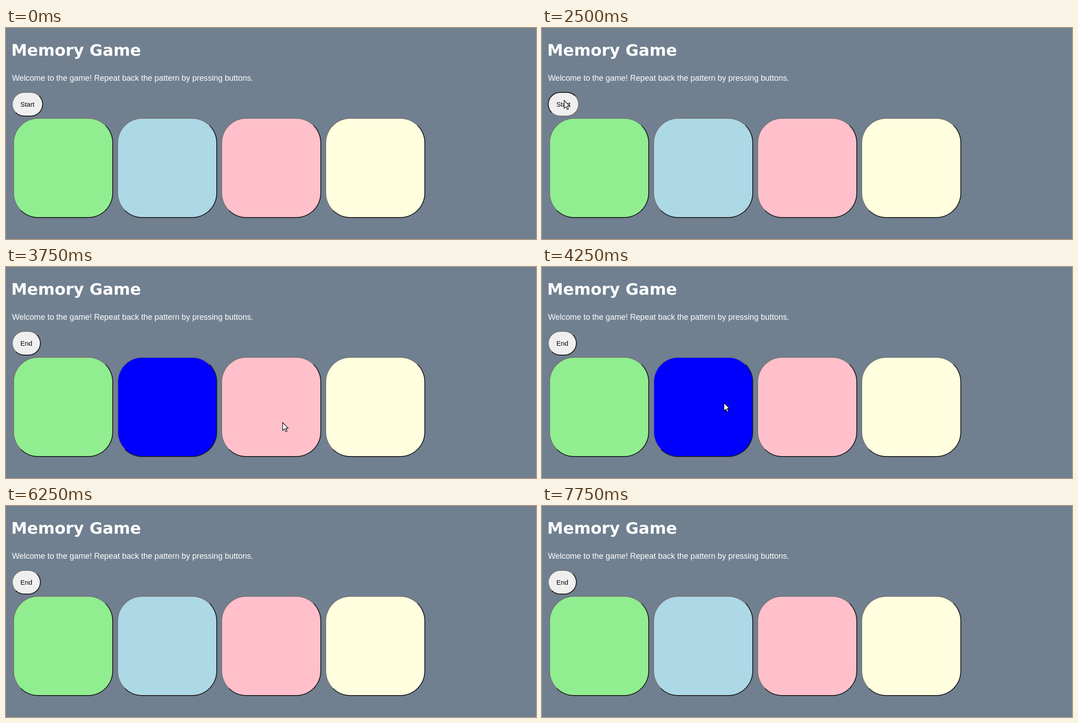
Animation of 1187x472 px, one loop 8000 ms. Source, as an HTML page:

```html
<!DOCTYPE html>
<html lang="en">
<head>
<meta charset="utf-8">
<title>Memory Game</title>
<style>
  :root { --light: #767676; --dark: #212121; }
  html, body { margin: 0; width: 100%; height: 100%; overflow: hidden; background: #708090; }
  svg { position: absolute; left: 0; top: 0; overflow: visible; }
  .copy { fill: #fff; }
  .copy .title { font: bold 35.84px "DejaVu Sans", Verdana, sans-serif; }
  .copy .intro { font: 17.92px "Liberation Sans", Arial, sans-serif; }

  .button, .tile {
    position: absolute;
    box-sizing: border-box;
    border: 2px solid;
    border-color: var(--light) var(--dark) var(--dark) var(--light);
  }
  .button {
    left: 13.44px; top: 143px; height: 55px;
    padding: 0 16.8px;
    border-radius: 28px;
    background: #efefef; color: #000;
    font: 14.93px/51px "Liberation Sans", Arial, sans-serif;
    white-space: nowrap;
  }
  .tile { top: 201px; width: 224px; height: 224px; border-radius: 56px; }
  .green { left: 16px; background: lightgreen; }
  .blue { left: 249px; background: lightblue; }
  .pink { left: 482px; background: pink; }
  .yellow { left: 715px; background: lightyellow; }

  .start, .end, .blue, .cursor { animation: 8s step-end infinite; }
  .start { animation-name: start; }
  .end { animation-name: end; }
  .blue { animation-name: flash; }
  .cursor { animation-name: point; }

  @keyframes start {
    0% { visibility: visible; border-color: var(--light) var(--dark) var(--dark) var(--light); }
    31.25% { visibility: visible; border-color: var(--dark) var(--light) var(--light) var(--dark); }
    34.375%, 100% { visibility: hidden; border-color: var(--light) var(--dark) var(--dark) var(--light); }
  }
  @keyframes end {
    0% { visibility: hidden; }
    34.375%, 100% { visibility: visible; }
  }
  @keyframes flash {
    0%, 56.25%, 96.875%, 100% { background: lightblue; }
    46.875%, 84.375% { background: blue; }
  }
  @keyframes point {
    0% { visibility: hidden; transform: translate(21px, 442px); }
    6.25% { visibility: visible; transform: translate(21px, 442px); }
    9.375% { visibility: visible; transform: translate(31px, 171px); }
    12.5% { visibility: visible; transform: translate(45px, 157px); }
    21.875% { visibility: visible; transform: translate(49px, 161px); }
    34.375% { visibility: visible; transform: translate(91px, 171px); }
    37.5% { visibility: visible; transform: translate(503px, 308px); }
    40.625% { visibility: visible; transform: translate(560px, 360px); }
    43.75% { visibility: visible; transform: translate(619px, 347px); }
    50% { visibility: visible; transform: translate(573px, 333px); }
    53.125% { visibility: visible; transform: translate(407px, 303px); }
    75% { visibility: visible; transform: translate(670px, 419px); }
    78.125%, 100% { visibility: hidden; transform: translate(670px, 419px); }
  }
</style>
</head>
<body>
  <svg class="copy" width="1187" height="472">
    <text class="title" x="11.7" y="62">Memory Game</text>
    <text class="intro" x="13.44" y="118">Welcome to the game! Repeat back the pattern by pressing buttons.</text>
  </svg>
  <div class="button start">Start</div>
  <div class="button end">End</div>
  <div class="tile green"></div>
  <div class="tile blue"></div>
  <div class="tile pink"></div>
  <div class="tile yellow"></div>
  <svg class="cursor" width="14" height="22">
    <path d="M.6 1V18.6L4.8 14.9L7.6 21.2L10.4 20L7.6 13.8H13Z" fill="#fff" stroke="#000" stroke-width="1.2"/>
  </svg>
</body>
</html>
```
